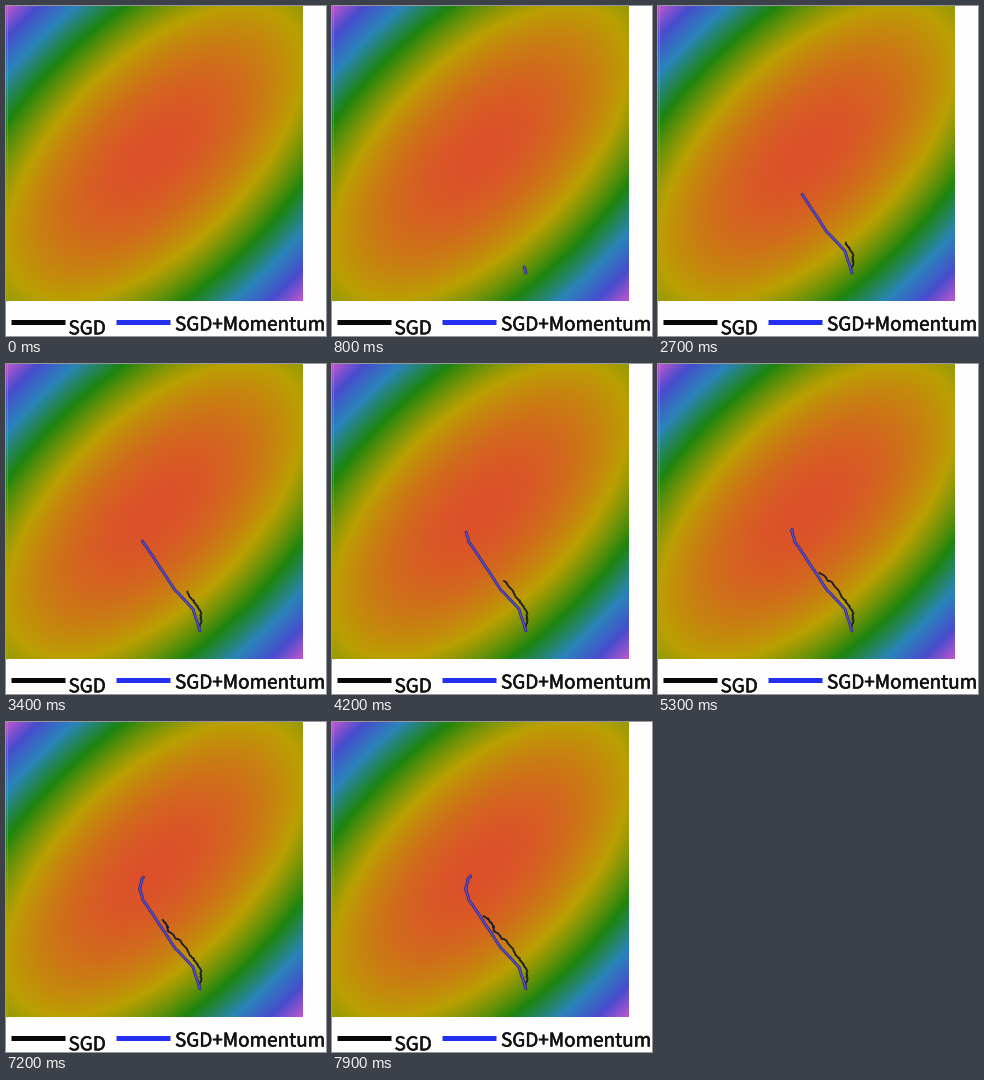
A matplotlib script for the animation above (8000 ms loop, 320 by 330 pixels).

```python
import numpy as np
import matplotlib.pyplot as plt
from matplotlib import patheffects
from matplotlib.animation import FuncAnimation

W, H = 320, 330
FW, FH = 296.6, 294.8      # size of the loss surface
FRAMES, STEP = 80, 100     # frame count, ms per frame
START = 0.65               # seconds before the descent begins
PT = 0.72                  # points per pixel at 100 dpi

rng = np.random.default_rng(4)
time = np.arange(FRAMES) * STEP / 1000

fig = plt.figure(figsize=(W / 100, H / 100), dpi=100, facecolor="#fdfefd")
ax = fig.add_axes([0, 0, 1, 1])
ax.set_axis_off()


def surface(n=300):
    """Tilted quadratic bowl coloured by height with evenly spaced hues."""
    x, y = np.meshgrid(np.linspace(-1, 1, n), np.linspace(-1, 1, n))
    z = x * x + y * y + 1.2 * x * y
    hues = np.array([(221, 80, 42), (187, 160, 2), (30, 133, 14),
                     (42, 132, 186), (72, 76, 206), (192, 88, 206)]) / 255
    level = np.linspace(0, z.max(), len(hues))
    return np.dstack([np.interp(z, level, c) for c in hues.T])


def descend(stops, noise):
    """Optimizer position at every frame: drift through stops plus smooth noise."""
    t, x, y = np.array(stops).T
    path = np.column_stack([np.interp(time, t, x), np.interp(time, t, y)])
    for k in (0, 1):
        wobble = np.convolve(rng.normal(0, noise, FRAMES), np.ones(3) / 3, "same")
        path[:, k] += np.where(time > START, wobble, 0)
    return path


def stroke(color, width):
    return ax.plot([], [], color=color, lw=width * PT, solid_capstyle="round",
                   solid_joinstyle="round")[0]


ax.imshow(surface(), extent=(0, FW, FH, 0), interpolation="bilinear")
ax.plot([0.5, 0.5], [0, FH], color="#999999", lw=PT, alpha=0.5)

for x0, x1, color in ((5, 59, "#080808"), (109.5, 164, "#2330f0")):
    ax.plot([x0, x1], [316.2, 316.2], color=color, lw=5 * PT, solid_capstyle="butt")
for x, y, label in ((62.5, 328.3, "SGD"), (169, 324.5, "SGD+Momentum")):
    ax.text(x, y, label, family="Noto Sans CJK JP", size=18.9 * PT, color="#111111",
            path_effects=[patheffects.withStroke(linewidth=0.4, foreground="#111111")])

sgd = descend([(START, 194, 267), (1.7, 195, 247), (2.7, 188, 237), (4.2, 172, 216),
               (5.3, 162, 208), (6.5, 160, 202), (7.9, 153, 194)], 1.2)
momentum = descend([(START, 194, 267), (1.2, 187, 245), (1.7, 169, 226),
                    (2.7, 144, 188), (3.3, 137, 178), (4.2, 134, 168),
                    (5.3, 134, 165), (6.5, 136, 157), (7.9, 139, 154)], 0.3)

trails = [(sgd, stroke("#20202a", 1.9)),
          (momentum, stroke("#2e2878", 2.9)),
          (momentum, stroke("#5a4cd2", 1.5))]

ax.set_xlim(0, W)
ax.set_ylim(H, 0)
ax.set_aspect("auto")


def draw(i):
    first = int(START * 1000 // STEP)
    for path, line in trails:
        line.set_data(*path[first:i + 1].T if i > first else ([], []))
    return []


anim = FuncAnimation(fig, draw, frames=FRAMES, interval=STEP,
                     init_func=lambda: draw(0), repeat=True, repeat_delay=0)
plt.show()
```
